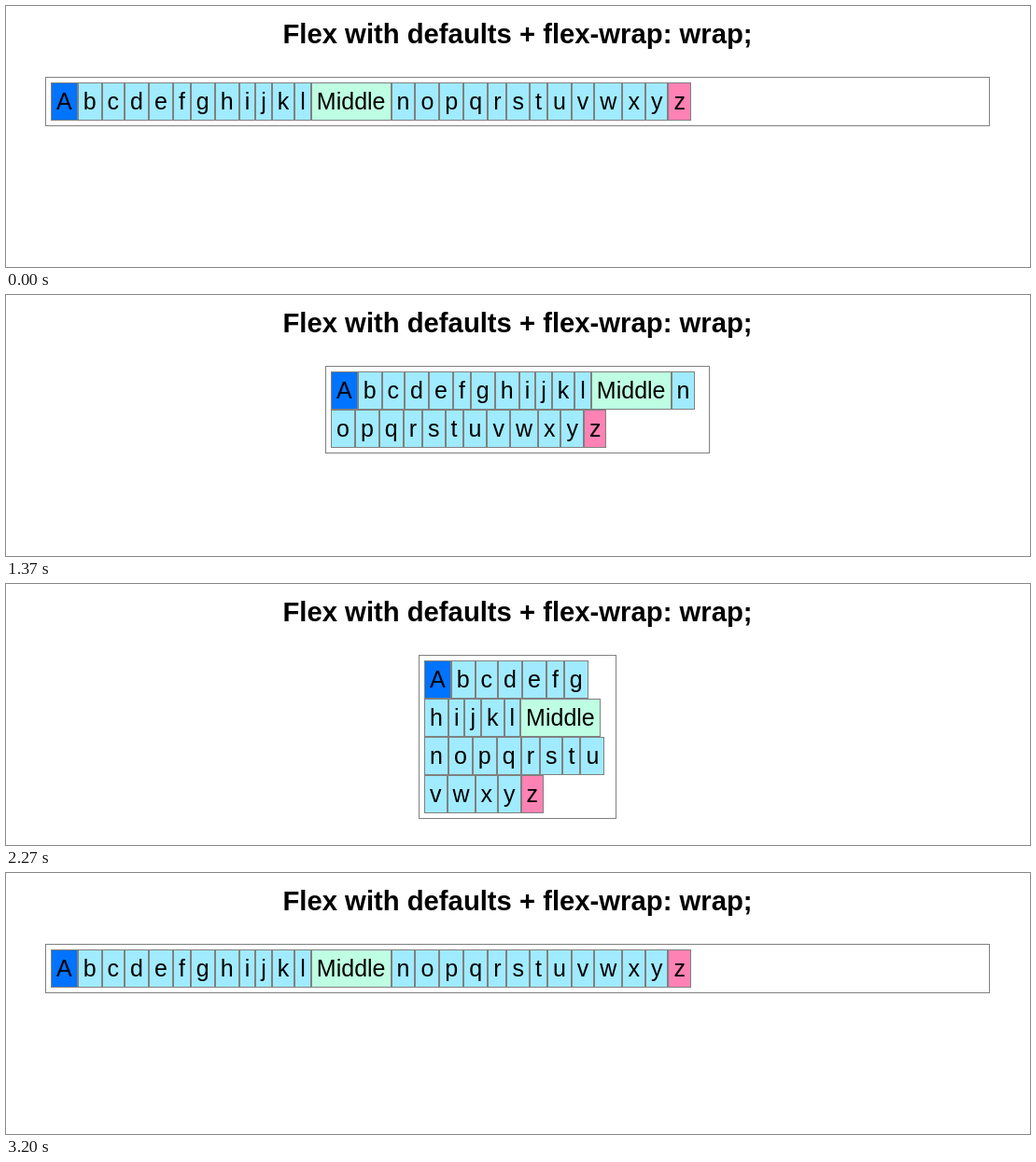
Animation of 1097 by 280 pixels, one loop 3.49 s. Source, as an HTML page:

```html
<!DOCTYPE html>
<html lang="en">
<head>
<meta charset="utf-8">
<title>Flex wrap</title>
<style>
  html, body { margin: 0; width: 100%; height: 100%; overflow: hidden; background: #fff; }
  body { position: relative; color: #000; font: 25px/29px Arial, "Liberation Sans", sans-serif; }
  h3 {
    position: absolute; left: 0; top: 13px; width: 1096px; margin: 0;
    font-size: 29.25px; line-height: 34px; text-align: center; white-space: nowrap;
  }
  #box {
    position: absolute; top: 76px; box-sizing: border-box; padding: 5px;
    border: 1px solid #808080; display: flex; flex-wrap: wrap;
  }
  #box div { padding: 5px; border: 1px solid #808080; background: #a0ebff; }
  #box .first { background: #0073ff; }
  #box .middle { background: #beffe3; }
  #box .last { background: #ff82b4; }
</style>
</head>
<body>
<h3>Flex with defaults + flex-wrap: wrap;</h3>
<div id="box"></div>
<script>
  const LOOP = 3490, STEP = 30, CENTER = 548;
  const box = document.getElementById('box');
  const special = { A: 'first', Middle: 'middle', z: 'last' };

  for (const label of 'A b c d e f g h i j k l Middle n o p q r s t u v w x y z'.split(' ')) {
    const item = document.createElement('div');
    item.textContent = label;
    item.className = special[label] || '';
    box.append(item);
  }

  // Hand-dragged width: time in ms, width in px
  const keys = [
    [350, 1012], [660, 800.7], [890, 652], [1370, 412], [1670, 296.7],
    [2060, 208], [2270, 212], [2530, 694], [2830, 842.7], [3200, 1012]
  ];
  const slopes = keys.slice(1).map(([t, w], i) => (w - keys[i][1]) / (t - keys[i][0]));
  // Monotone tangents keep the curve from overshooting its keys.
  const tangents = keys.map((_, i) => {
    const a = slopes[i - 1] || 0, b = slopes[i] || 0;
    return a * b > 0 ? 2 * a * b / (a + b) : 0;
  });

  function widthAt(time) {
    const i = keys.findLastIndex(([t]) => t <= time);
    if (i < 0 || i === keys.length - 1) return keys[0][1];
    const [t0, w0] = keys[i], [t1, w1] = keys[i + 1];
    const span = t1 - t0;
    const u = Math.floor((time - t0) / STEP) * STEP / span, v = 1 - u;
    return w0 * (1 + 2 * u) * v * v + w1 * u * u * (3 - 2 * u)
      + span * u * v * (tangents[i] * v - tangents[i + 1] * u);
  }

  function draw(time) {
    const width = widthAt(time);
    box.style.left = CENTER - width / 2 + 'px';
    box.style.width = width + 'px';
  }

  const start = performance.now();
  function tick() {
    draw((performance.now() - start) % LOOP);
    requestAnimationFrame(tick);
  }
  tick();
</script>
</body>
</html>
```
